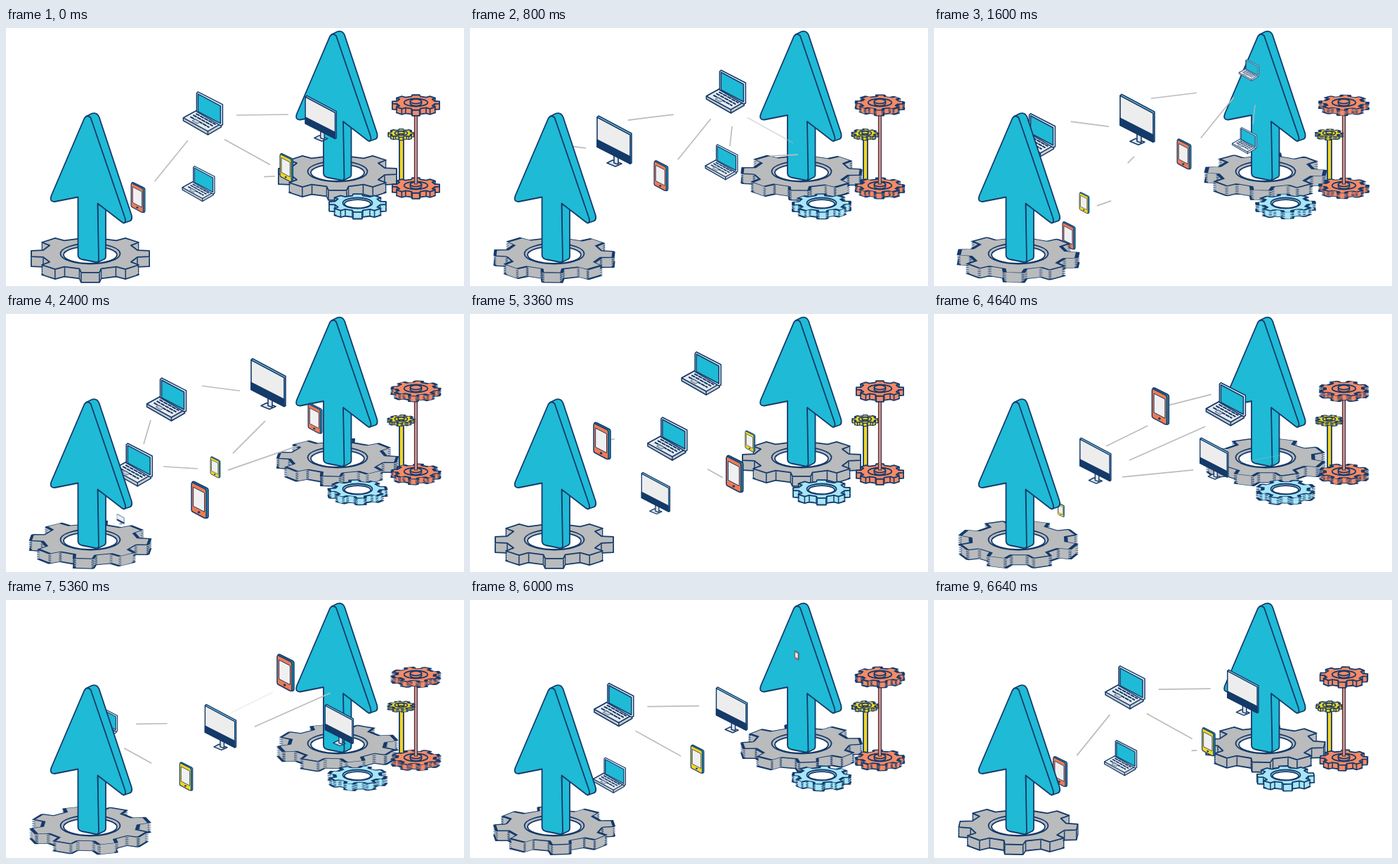
An HTML page without scripts that plays this animation: 652 by 367 pixels, repeating every 6720 ms.

```html
<!DOCTYPE html>
<html lang="en">
<head>
<meta charset="utf-8">
<title>Connected devices</title>
<style>
@property --turn { syntax: "<angle>"; inherits: true; initial-value: 0deg; }
@property --way { syntax: "<number>"; inherits: false; initial-value: 0; }
@property --in { syntax: "<number>"; inherits: false; initial-value: 1; }
@property --out { syntax: "<number>"; inherits: false; initial-value: 1; }

html, body { margin: 0; width: 100%; height: 100%; overflow: hidden; background: #fff; }
svg { display: block; width: 100vw; height: 100vh; animation: turn 6.72s steps(84) -4ms infinite; }
.ink { stroke: #143a6a; stroke-width: 1.8; stroke-linejoin: round; stroke-linecap: round; }
.fix { vector-effect: non-scaling-stroke; }
.spin { transform: rotate(var(--turn)); }

/* --b: birth time, --d: time the exit begins (ms) */
.dev, .line {
  translate: calc(var(--way) * 705.6px) calc(var(--way) * -258.7px);
  animation: drift 6.72s steps(84) infinite;
  animation-delay: calc(var(--b) * 1ms - 6724ms);
}
.dev use {
  scale: calc(var(--in) * var(--out));
  animation: grow 6.72s infinite, shrink 6.72s infinite;
  animation-delay: calc(var(--b) * 1ms - 6724ms), calc(var(--d) * 1ms - 6724ms);
}
.line path {
  fill: none; stroke: #bcbcbc; stroke-width: 1.7; stroke-dasharray: 1 2;
  opacity: var(--out);
  animation: draw 6.72s infinite, fade 6.72s infinite;
  animation-delay: calc(var(--b) * 1ms - 6724ms), calc(var(--d) * 1ms - 6724ms);
}
@keyframes turn { to { --turn: -360deg; } }
@keyframes drift { from { --way: 0; } to { --way: 1; } }
@keyframes grow {
  0% { --in: 0; animation-timing-function: steps(4); }
  4.762%, 75% { --in: 1; animation-timing-function: step-end; }
  75.01%, 100% { --in: 0; }
}
@keyframes shrink {
  0% { --out: 1; animation-timing-function: steps(4); }
  4.762%, 45% { --out: 0; animation-timing-function: step-end; }
  45.01%, 100% { --out: 1; }
}
@keyframes draw {
  0% { stroke-dashoffset: 1; animation-timing-function: steps(5); }
  5.952%, 60% { stroke-dashoffset: 0; animation-timing-function: step-end; }
  60.01%, 100% { stroke-dashoffset: 1; }
}
@keyframes fade {
  0% { --out: 1; animation-timing-function: steps(4); }
  4.762%, 60% { --out: 0; animation-timing-function: step-end; }
  60.01%, 100% { --out: 1; }
}
</style>
</head>
<body>
<svg viewBox="0 0 652 367" preserveAspectRatio="none">
<defs>
  <!-- cog seen from above, then tilted and stacked into a solid -->
  <path id="cog" class="fix" d="M67-15.5 84-13 84 13 67 15.5 58 37 69 50 50 69 37 58 15.5 67 13 84-13 84-15.5 67-37 58-50 69-69 50-58 37-67 15.5-84 13-84-13-67-15.5-58-37-69-50-50-69-37-58-15.5-67-13-84 13-84 15.5-67 37-58 50-69 69-50 58-37z"/>
  <path id="dots" class="fix" d="M67-15.5h.01M84-13h.01M84 13h.01M67 15.5h.01"/>
  <g id="quad">
    <use href="#dots"/><use href="#dots" transform="rotate(90)"/>
    <use href="#dots" transform="rotate(180)"/><use href="#dots" transform="rotate(270)"/>
  </g>
  <g id="edge" transform="scale(1 .32)"><use class="spin" href="#cog"/></g>
  <g id="wall" transform="scale(1 .32)">
    <g class="spin">
      <use href="#cog" style="stroke:none"/>
      <use href="#quad"/><use href="#quad" transform="rotate(45)"/>
    </g>
  </g>
  <g id="flat">
    <use href="#edge" y="14"/>
    <use href="#wall" y="12.5"/><use href="#wall" y="11"/><use href="#wall" y="9.5"/>
    <use href="#wall" y="8"/><use href="#wall" y="6.5"/><use href="#wall" y="5"/>
    <use href="#wall" y="3.5"/><use href="#wall" y="2"/>
    <use href="#edge"/>
  </g>
  <g id="thick">
    <use href="#edge" y="20"/>
    <use href="#wall" y="17"/><use href="#wall" y="14"/><use href="#wall" y="11"/>
    <use href="#wall" y="8"/><use href="#wall" y="5"/><use href="#wall" y="2"/>
    <use href="#edge"/>
  </g>
  <g id="hubbed">
    <use href="#thick"/>
    <ellipse class="fix" rx="42" ry="14"/>
    <path class="fix" d="M-20-4V4A20 8 0 0 0 20 4V-4"/>
    <ellipse class="fix" cy="-4" rx="20" ry="8"/>
  </g>

  <g id="base" class="ink" fill="#b9bbbd">
    <use href="#flat"/>
    <ellipse rx="42.5" ry="14.5"/>
    <ellipse cy="1.8" rx="38" ry="12.2" fill="#fff"/>
  </g>
  <g id="arrow" class="ink" fill="#1fbad6">
    <path d="M480 133 491.500 141V208Q491.500 212 488 213L480 217z"/>
    <path d="M464 9 472 5Q479 3 482 10L528 149Q530 156 526 158L517 161z"/>
    <path d="M461 12Q465 6 470 11L519 154Q521 163 515 160L480 133 481.500 213Q481.500 217 477 216.500L457 212.500Q452 211 452 206V124L419 130.500Q411 131 414 122z"/>
  </g>

  <g id="monitor" class="ink" style="stroke-width:1.6">
    <path d="M-10 31-2 27 11 32 2 36z" fill="#dfe3e6"/>
    <path d="M0 18V31L6 33V21z" fill="#dfe3e6"/>
    <path d="M-24-34-22-36 25-11V31L23 32z" fill="#8fdcec"/>
    <path d="M-24-34 23-9V32L-24 8z" fill="#ededee"/>
    <path d="M-24-2 23 22V32L-24 8z" fill="#143a6a"/>
  </g>
  <g id="laptop" class="ink" style="stroke-width:1.5">
    <path d="M-28 6-8-5 26 14V19L7 30-28 10z" fill="#c9ced3"/>
    <path d="M-28 6-8-5 26 14 7 25z" fill="#e8eaec"/>
    <path d="M7 25V30" fill="none"/>
    <path d="M-9-29-7-31 28-13V16L25 17-9-3z" fill="#e8f4f8"/>
    <path d="M-7-28 25-11V14L-7-3z" fill="#1fbad6"/>
    <path d="M-10 0 18 15.500M-14 2 14 17.500M-18 4.500 9 19.500" fill="none" style="stroke-width:2;stroke-dasharray:6 .8;stroke-linecap:butt"/>
    <path d="M-15 10-11 8-4 12-8 14z" fill="#c9ced3" style="stroke-width:.7"/>
  </g>
  <g id="phone" class="ink" style="stroke-width:1.5">
    <path d="M-11-24Q-11-27-8-26L10-17Q12-16 12-14V23Q12 26 9 26z" fill="#1c8fae"/>
    <path d="M-12-22Q-12-26-9-24L7-16Q9-15 9-12V23Q9 27 6 25.500L-10 17Q-12 16-12 14z"/>
    <path d="M-9-18 6.500-10V17L-9 9z" fill="#f0f0f1" style="stroke-width:1"/>
    <circle cx="-1.500" cy="17.500" r="1.500" fill="#143a6a" style="stroke-width:.5"/>
  </g>
</defs>

<use href="#base" x="472" y="204"/>
<use href="#arrow"/>

<!-- small gears -->
<g class="ink">
  <path d="M560 156h6v62h-6z" fill="#f5d327"/>
  <g fill="#a6e6f7" transform="translate(500.500 249)">
    <use href="#thick" transform="scale(-.48 .48)"/>
    <ellipse rx="21" ry="7.500"/>
    <ellipse cy="1.200" rx="18.500" ry="6" fill="#fff"/>
  </g>
  <g fill="#f58a67">
    <use href="#hubbed" transform="translate(583.500 224) scale(.4)"/>
    <path d="M581.500 116h4v106h-4z" style="stroke-width:1.200"/>
  </g>
  <g style="stroke-width:1.400">
    <use href="#hubbed" fill="#f5d327" transform="translate(562.500 149.500) scale(.217)"/>
  </g>
  <use href="#hubbed" fill="#f58a67" transform="translate(583.500 106) scale(.4)"/>
</g>

<!-- links -->
<g class="line" style="--b:5120;--d:160"><path pathLength="1" d="M160 185.600 234 184.600"/></g>
<g class="line" style="--b:6160;--d:1600"><path pathLength="1" d="M200 181.600 153 239.600"/></g>
<g class="line" style="--b:5120;--d:640"><path pathLength="1" d="M143 220 208 256"/></g>
<g class="line" style="--b:6560;--d:1040"><path pathLength="1" d="M366 217 327 219"/></g>
<g class="line" style="--b:320;--d:1520"><path pathLength="1" d="M322.600 158.500 319.600 186.500"/></g>
<g class="line" style="--b:240;--d:1760"><path pathLength="1" d="M166 152.600 231 144.600"/></g>
<g class="line" style="--b:640;--d:2560"><path pathLength="1" d="M148 177 94 170"/></g>
<g class="line" style="--b:1920;--d:2800"><path pathLength="1" d="M155.600 169.500 145.600 203.500"/></g>
<g class="line" style="--b:1920;--d:2720"><path pathLength="1" d="M173.600 235.500 222.600 238.500"/></g>
<g class="line" style="--b:1520;--d:2720"><path pathLength="1" d="M276.600 186 230.600 232"/></g>
<g class="line" style="--b:1520;--d:2640"><path pathLength="1" d="M223.600 256 324.600 221"/></g>
<g class="line" style="--b:3200;--d:4320"><path pathLength="1" d="M343 239 289 209"/></g>
<g class="line" style="--b:3280;--d:4720"><path pathLength="1" d="M184 184 252 166.700"/></g>
<g class="line" style="--b:3600;--d:5120"><path pathLength="1" d="M195 199 136 228"/></g>
<g class="line" style="--b:3600;--d:5520"><path pathLength="1" d="M277 200 169 248"/></g>
<g class="line" style="--b:3600;--d:4880"><path pathLength="1" d="M159 272 260 262"/></g>
<g class="line" style="--b:3600;--d:4400"><path pathLength="1" d="M323 252 383 241"/></g>

<!-- devices -->
<g class="dev" style="--b:-80;--d:2960" transform="translate(112.600 194.900)"><use href="#monitor"/></g>
<g class="dev" style="--b:2320;--d:5440" transform="translate(154.800 295) scale(.82)"><use href="#monitor"/></g>
<g class="dev" style="--b:3520;--d:80" transform="translate(111.800 251.800) scale(.9)"><use href="#monitor"/></g>
<g class="dev" style="--b:1280;--d:4320" transform="translate(110.900 165.100)"><use href="#laptop"/></g>
<g class="dev" style="--b:1760;--d:4800" transform="translate(113 239.600)"><use href="#laptop"/></g>
<g class="dev" style="--b:5120;--d:1440" transform="translate(112.400 183.400)"><use href="#laptop"/></g>
<g class="dev" style="--b:5600;--d:1520" transform="translate(156.400 265.100) scale(.82)"><use href="#laptop"/></g>
<g fill="#f07a52">
  <g class="dev" style="--b:1360;--d:4080" transform="translate(166.800 304.500)"><use href="#phone"/></g>
  <g class="dev" style="--b:2640;--d:5760" transform="translate(112.400 208.200)"><use href="#phone"/></g>
  <g class="dev" style="--b:6240;--d:2480" transform="translate(137.600 259.500) scale(.82)"><use href="#phone"/></g>
</g>
<g fill="#f5d327">
  <g class="dev" style="--b:1120;--d:3680" transform="translate(163.600 267.300) scale(.58)"><use href="#phone"/></g>
  <g class="dev" style="--b:4480;--d:400" transform="translate(164.100 284.900) scale(.77)"><use href="#phone"/></g>
</g>

<use href="#base" x="120" y="321"/>
<use href="#arrow" x="-349.500" y="116.500"/>
</svg>
</body>
</html>
```
